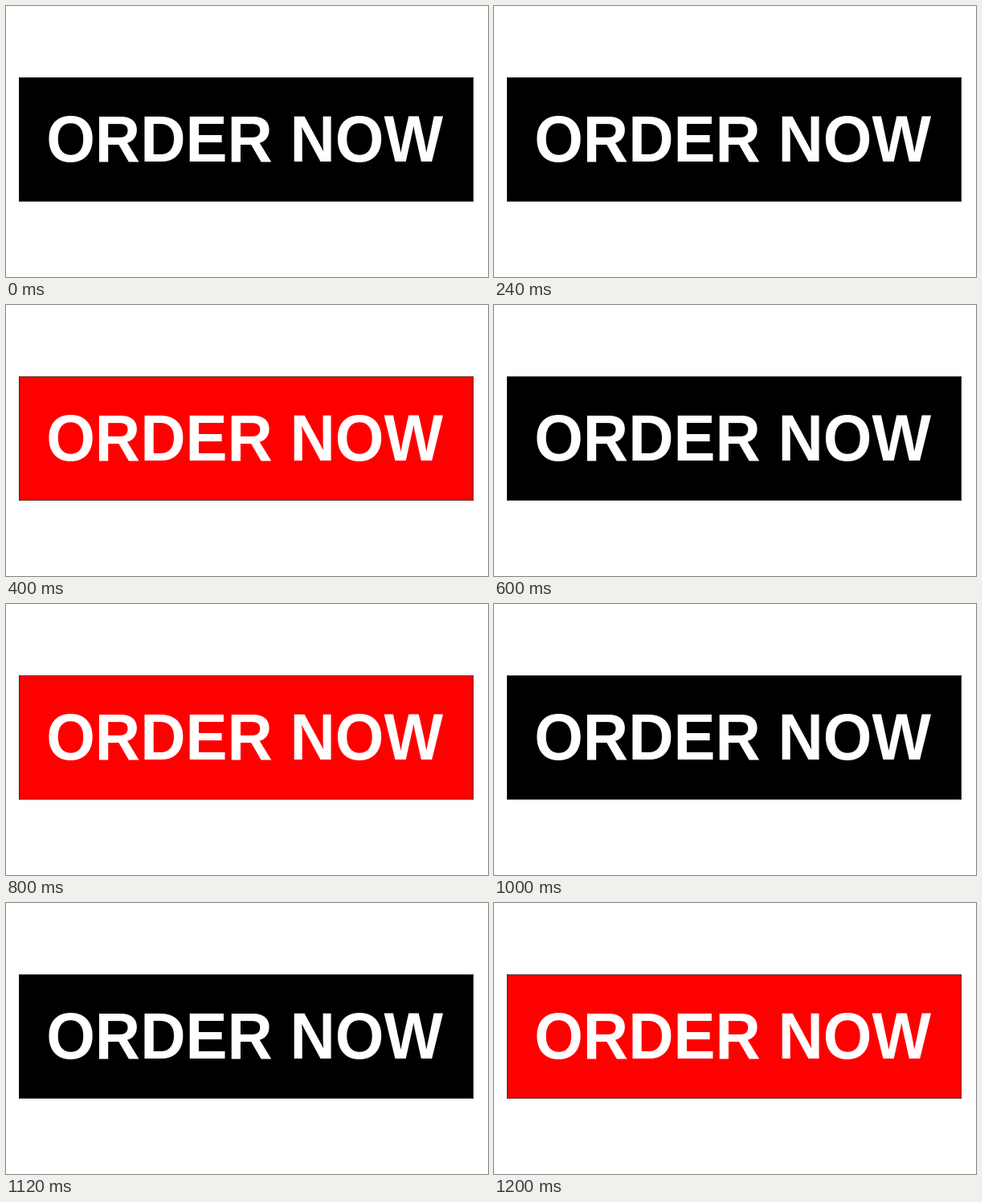
An HTML page that plays this animation: 600x338 px, repeating every 1400 ms.

```html
<!DOCTYPE html>
<html lang="en">
<head>
<meta charset="utf-8">
<title>Order now</title>
<style>
  html, body { margin: 0; width: 100%; height: 100%; overflow: hidden; background: #fff; }
  svg { display: block; }
  text { font: bold 78px "Liberation Sans", Arial, sans-serif; fill: #fff; }
</style>
</head>
<body>
<svg width="600" height="338" viewBox="0 0 600 338">
  <rect id="button" x="16.3" y="89.3" width="565.4" height="154.4" stroke="#000" stroke-width=".6"/>
  <!-- Slightly tall capitals, standing on the baseline -->
  <text transform="translate(50.2 194) scale(1 1.04)">ORDER NOW</text>
</svg>
<script>
  const LOOP = 1400, HOLD = 400, BLINK = 200;
  const button = document.getElementById("button");

  function draw() {
    const t = performance.now() % LOOP;
    const red = t >= HOLD && Math.floor((t - HOLD) / BLINK) % 2 === 0;
    button.setAttribute("fill", red ? "#f00" : "#000");
    requestAnimationFrame(draw);
  }
  draw();
</script>
</body>
</html>
```
